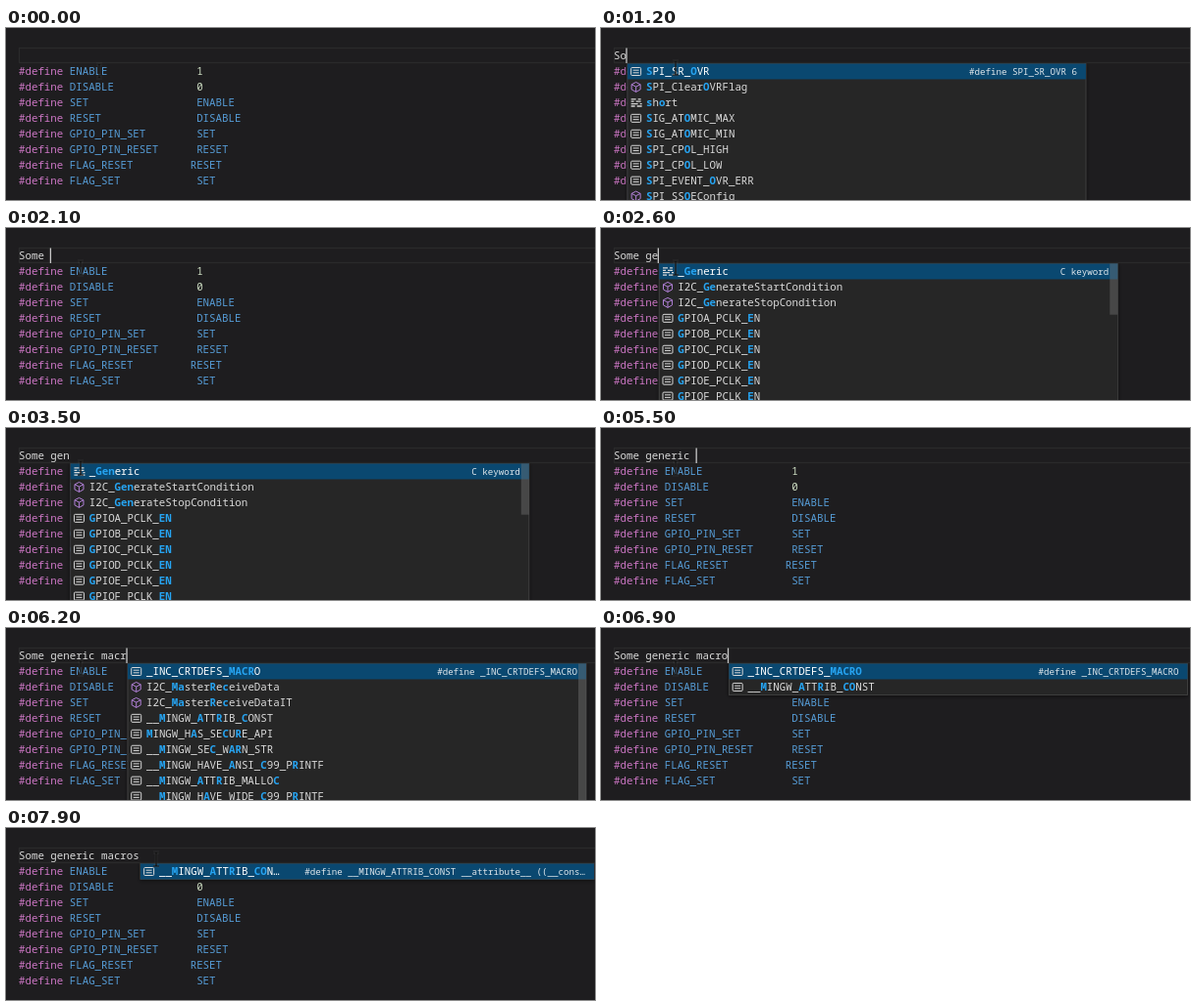
These frames come from a looping animation (600x176 px, 8 s). An HTML page:

```html
<!DOCTYPE html>
<html lang="en">
<head>
<meta charset="utf-8">
<title>Code completion</title>
<style>
  html, body { margin: 0; width: 100%; height: 100%; overflow: hidden; background: #1e1d1f; }
  svg { display: block; width: 600px; height: 176px; }
  text { font: 500 10.78px "Noto Sans Mono", "DejaVu Sans Mono", monospace; white-space: pre; fill: #dadada; }
  .dir { fill: #cc76c4; }
  .name { fill: #569cd6; }
  .num { fill: #cfdfc4; }
  .first { fill: #fff; }
  .hit { fill: #26a4f2; font-weight: 700; }
  .detail { font-size: 9.17px; text-anchor: end; fill: #dfe7ec; }
</style>
</head>
<body>
<svg id="stage" viewBox="0 0 600 176">
  <defs>
    <g id="constant" fill="none" stroke="#d8d8d8">
      <rect x="-5" y="-4" width="10" height="8" rx="1"/>
      <path d="M-3-1.3H3M-3 1.3H3"/>
    </g>
    <path id="method" fill="none" stroke="#b180d7" stroke-linejoin="round"
      d="M0-5L4.5-2.7V2.5L0 5L-4.5 2.5V-2.7ZM-4.5-2.7L0-.4L4.5-2.7M0-.4V5"/>
    <path id="keyword" fill="none" stroke="#d8d8d8" stroke-width="1.3"
      d="M-5-3.6H0M2-3.6H5M-5-1.2H-2M0-1.2H5M-5 1.2H2M4 1.2H6M-5 3.6H-1M1 3.6H6"/>
    <filter id="shadow" x="-5%" y="-20%" width="110%" height="150%">
      <feDropShadow dx="0" dy="1" stdDeviation="2" flood-color="#000" flood-opacity=".55"/>
    </filter>
  </defs>
  <rect width="600" height="176" fill="#1e1d1f"/>
  <rect x="13.5" y="20.5" width="600" height="15" fill="none" stroke="#2a2a2b" stroke-width="1.3"/>
  <g id="code"></g>
  <g id="typing"></g>
  <g id="popup"></g>
  <g id="mouse" fill="none">
    <path stroke="#777" stroke-opacity=".35" stroke-width="2.4" d="M-3-7H3M0-7V7M-3 7H3"/>
    <path stroke="#0b0b0b" stroke-width="1.2" d="M-3-7H3M0-7V7M-3 7H3"/>
  </g>
</svg>
<script>
const LOOP = 8000, STEP = 100;
const LEFT = 13, CHAR = 6.47, LINE = 15.95, BASE = 31.9;
const VISIBLE_ROWS = 12;
const SENTENCE = "Some generic macros";

const defines = [
  ["ENABLE", "1"], ["DISABLE", "0"], ["SET", "ENABLE"], ["RESET", "DISABLE"],
  ["GPIO_PIN_SET", "SET"], ["GPIO_PIN_RESET", "RESET"],
  ["FLAG_RESET", "RESET", 27], ["FLAG_SET", "SET"]
];

// Time at which each character appears; the first entry is the empty line.
const keys = [
  -700, 900, 1100, 1400, 1700, 1900, 2300, 2500, 3000, 3800,
  4400, 4600, 5000, 5400, 5600, 5800, 6000, 6200, 6600, 7000
];

// [time, x, y]
const mousePath = [
  [0, 95, 44], [300, 90, 56], [400, 90, 56], [500, 76, 41],
  [7200, 76, 41], [7700, 153, 32], [LOOP, 153, 32]
];

const gpio = [..."ABCDEF"].map(port => `GPIO${port}_PCLK_EN`);
// total: length of the whole list behind the scroll bar
const pools = {
  s: { items: ["SPI_SR_OVR", "SPI_ClearOVRFlag", "short", "SIG_ATOMIC_MAX", "SIG_ATOMIC_MIN",
    "SPI_CPOL_HIGH", "SPI_CPOL_LOW", "SPI_EVENT_OVR_ERR", "SPI_SSOEConfig"] },
  gene: { items: ["_Generic", "I2C_GenerateStopCondition", "I2C_GenerateStartCondition"] },
  g: { total: 44, items: ["_Generic", "I2C_GenerateStartCondition", "I2C_GenerateStopCondition", ...gpio] },
  m: { total: 14, items: ["_INC_CRTDEFS_MACRO", "I2C_MasterReceiveData", "I2C_MasterReceiveDataIT",
    "__MINGW_ATTRIB_CONST", "MINGW_HAS_SECURE_API", "__MINGW_SEC_WARN_STR",
    "__MINGW_HAVE_ANSI_C99_PRINTF", "__MINGW_ATTRIB_MALLOC", "__MINGW_HAVE_WIDE_C99_PRINTF"] }
};
const details = {
  SPI_SR_OVR: "#define SPI_SR_OVR 6",
  SIG_ATOMIC_MAX: "#define SIG_ATOMIC_MAX INT32_MAX",
  _Generic: "C keyword",
  _INC_CRTDEFS_MACRO: "#define _INC_CRTDEFS_MACRO",
  __MINGW_ATTRIB_CONST: "#define __MINGW_ATTRIB_CONST __attribute__ ((__cons…"
};

const $ = id => document.getElementById(id);
const text = (x, y, body, cls = "") => `<text x="${x}" y="${y}" class="${cls}">${body}</text>`;
const rect = (x, y, w, h, more) => `<rect x="${x}" y="${y}" width="${w}" height="${h}" ${more}/>`;
const col = n => LEFT + n * CHAR;

function iconOf(label) {
  if (label === "short" || label === "_Generic") return "keyword";
  return /[a-z]/.test(label) ? "method" : "constant";
}

// Subsequence match that prefers neighbours, then word starts.
function match(label, query, from = 0) {
  if (!query) return [];
  const options = [];
  for (let i = from; i < label.length; i++) {
    if (label[i].toLowerCase() !== query[0]) continue;
    const prev = label[i - 1] || "_";
    const start = prev === "_" || (/[A-Z]/.test(label[i]) && /[a-z]/.test(prev));
    options.push({ i, rank: i === from && from ? 0 : start ? 1 : 2 });
  }
  options.sort((a, b) => a.rank - b.rank || a.i - b.i);
  for (const { i } of options) {
    const rest = match(label, query.slice(1), i + 1);
    if (rest) return [i, ...rest];
  }
  return null;
}

// Also accepts two neighbouring letters typed in swapped order.
function fuzzy(label, query) {
  let hits = match(label, query);
  for (let i = 1; !hits && i < query.length - 1; i++) {
    hits = match(label, query.slice(0, i) + query[i + 1] + query[i] + query.slice(i + 2));
  }
  return hits;
}

function popup(query, caret) {
  const key = query && Object.keys(pools).find(k => query.startsWith(k));
  if (!key) return "";
  const { items, total } = pools[key];
  const rows = items.map(label => ({ label, hits: fuzzy(label, query) })).filter(r => r.hits);
  if (!rows.length) return "";

  const x = caret + 1, top = 36.5, right = Math.min(caret + 468, 599), width = right - x;
  const detail = details[rows[0].label] || "";
  let out = rect(x, top, width, rows.length * LINE,
    'fill="#252526" stroke="#454545" stroke-width=".8" filter="url(#shadow)"');
  out += rect(x, top, width, LINE, 'fill="#0a4870"');
  rows.forEach(({ label, hits }, i) => {
    const mid = 44.5 + i * LINE;
    const shown = !i && detail.length > 40 ? label.slice(0, 18) + "…" : label;
    const body = [...shown].map((c, n) =>
      hits.includes(n) && c !== "…" ? `<tspan class="hit">${c}</tspan>` : c).join("");
    out += `<use href="#${iconOf(label)}" x="${caret + 9.7}" y="${mid}"/>`;
    out += text(caret + 20, mid + 3.9, body, i ? "" : "first");
  });
  if (total && rows.length === items.length) {
    const slider = VISIBLE_ROWS ** 2 * LINE / total;
    out += rect(right - 8, top, 8, slider, 'fill="#797979" fill-opacity=".4"');
  }
  return out + text(right - 9, 47.6, detail, "detail");
}

function mouseAt(t) {
  const n = mousePath.findIndex(p => p[0] > t);
  const [t0, x0, y0] = mousePath[n - 1], [t1, x1, y1] = mousePath[n];
  const k = (t - t0) / (t1 - t0);
  return [x0 + (x1 - x0) * k, y0 + (y1 - y0) * k];
}

function draw(t) {
  const count = keys.filter(k => k <= t).length - 1;
  const typed = SENTENCE.slice(0, count);
  const caret = col(count);
  const blink = (t - keys[count]) % 1000 < 500;
  $("typing").innerHTML = text(LEFT, BASE, typed) +
    (blink ? rect(caret - .6, 20.5, 1.3, 15.5, 'fill="#c8c8c8"') : "");
  $("popup").innerHTML = popup(typed.split(" ").pop().toLowerCase(), caret);
  $("mouse").setAttribute("transform", `translate(${mouseAt(t)})`);
}

$("code").innerHTML = defines.map(([name, value, at = 28], i) => {
  const y = BASE + (i + 1) * LINE;
  return text(LEFT, y, "#define", "dir") + text(col(8), y, name, "name") +
    text(col(at), y, value, /\d/.test(value) ? "num" : "name");
}).join("");

let last = -1;
const begin = performance.now();
function tick() {
  const t = Math.floor((performance.now() - begin) % LOOP / STEP) * STEP;
  if (t !== last) draw(last = t);
  requestAnimationFrame(tick);
}
tick();
</script>
</body>
</html>
```
